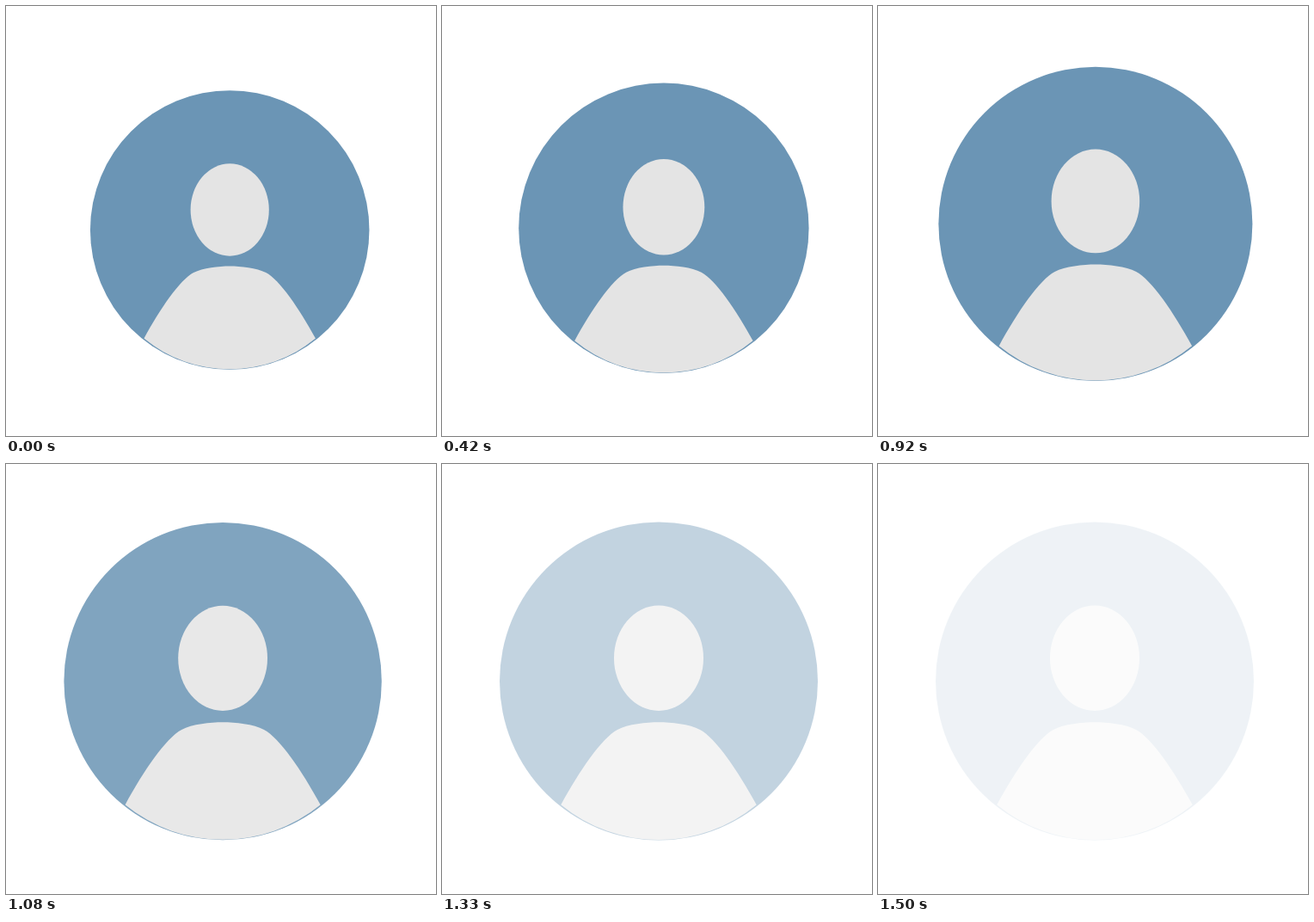
An HTML page that plays this animation: 500x500 px, repeating every 2.58 s.

```html
<!DOCTYPE html>
<html lang="en">
<head>
<meta charset="utf-8">
<title>Avatar</title>
<style>
  html, body { margin: 0; width: 100%; height: 100%; overflow: hidden; background: #fff; }
  svg { display: block; width: 100%; height: 100%; }
</style>
</head>
<body>
<svg viewBox="0 0 500 500">
  <g id="avatar">
    <circle r="185" fill="#6b95b5"/>
    <g fill="#e4e4e4">
      <ellipse cy="-26.8" rx="52" ry="61.2"/>
      <path d="M-113.7 143.8C-92 104-66 66-48 56.5C-36 50-14 47.8 0 47.8S36 50 48 56.5C66 66 92 104 113.7 143.8A179 179 0 0 1-113.7 143.8Z"/>
    </g>
  </g>
</svg>
<script>
  const LOOP = 2580;
  const FPS = 12;
  const LAST_STEP = 18;
  const GROW_STEPS = 14;
  const FADE_START = 12;
  const FADE_STEPS = 6.75;

  const avatar = document.getElementById('avatar');
  const clamp = v => Math.min(1, Math.max(0, v));
  const mix = (a, b, k) => a + (b - a) * k;
  const easeInOut = k => (1 - Math.cos(Math.PI * k)) / 2;

  function draw(ms) {
    // The motion advances in discrete steps, then holds until the loop ends.
    const step = Math.min(LAST_STEP, Math.floor(ms * FPS / 1000 + 0.085));
    const k = easeInOut(clamp(step / GROW_STEPS));
    const x = mix(260.2, 252, k);
    const y = mix(260.5, 252.5, k);
    const scale = mix(0.877, 1, k);
    avatar.setAttribute('transform', `translate(${x} ${y}) scale(${scale})`);
    avatar.setAttribute('opacity', 1 - clamp((step - FADE_START) / FADE_STEPS));
  }

  const start = performance.now();
  function tick() {
    draw((performance.now() - start) % LOOP);
    requestAnimationFrame(tick);
  }
  tick();
</script>
</body>
</html>
```
